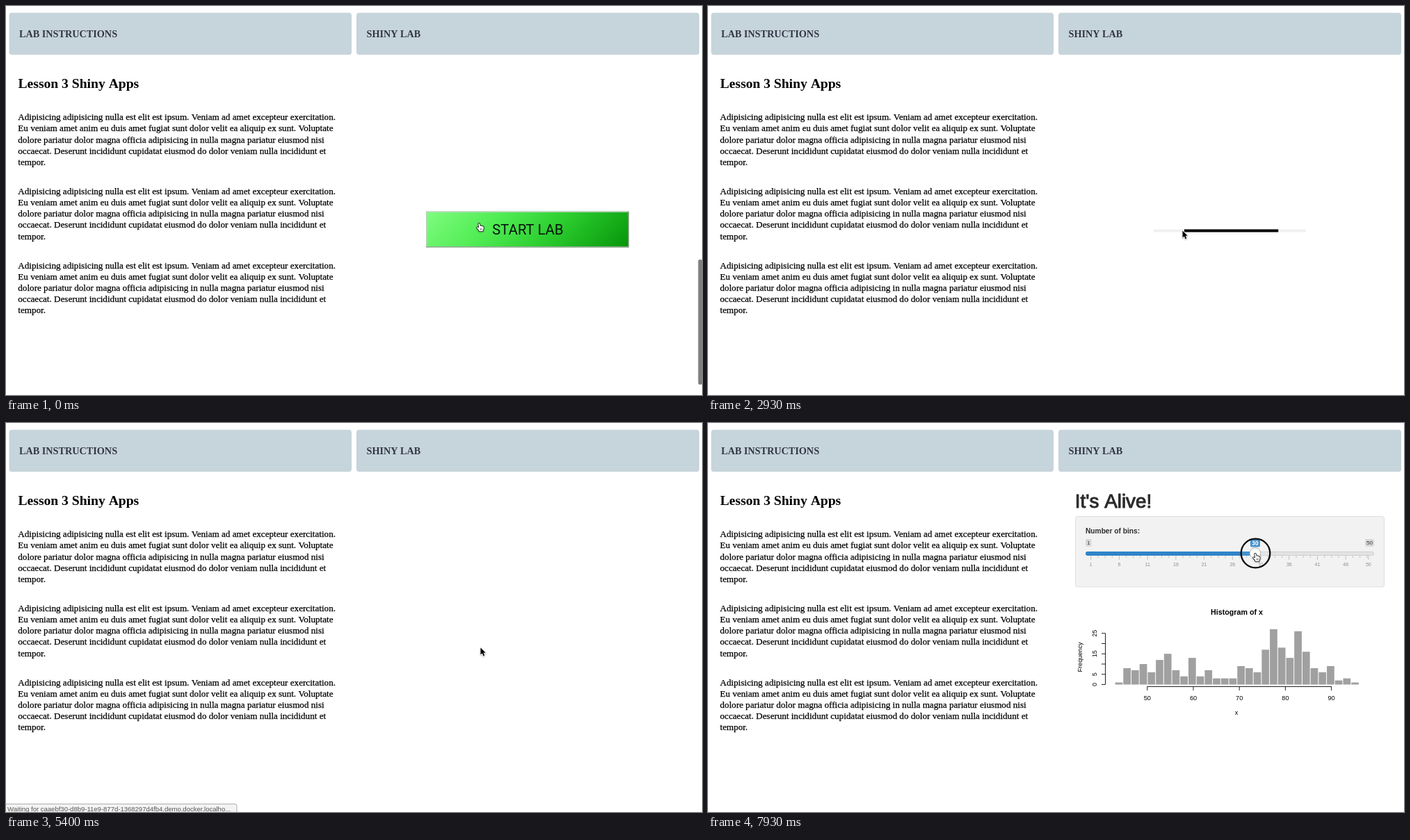
Write an HTML page with a canvas that moves like this. It is 1001 by 560 pixels and loops after 8 s.

```html
<!DOCTYPE html>
<html lang="en">
<head>
<meta charset="utf-8">
<title>Shiny lab</title>
<style>
  html, body { margin: 0; width: 100%; height: 100%; overflow: hidden; background: #fff; }
  canvas { display: block; width: 1001px; height: 560px; }
</style>
</head>
<body>
<canvas id="stage" width="1001" height="560"></canvas>
<script>
const ctx = document.getElementById('stage').getContext('2d');
const LOOP = 8000;
const SERIF = '"Liberation Serif", serif';
const SANS = '"Liberation Sans", sans-serif';

const PARAGRAPH = [
  'Adipisicing adipisicing nulla est elit est ipsum. Veniam ad amet excepteur exercitation.',
  'Eu veniam amet anim eu duis amet fugiat sunt dolor velit ea aliquip ex sunt. Voluptate',
  'dolore pariatur dolor magna officia adipisicing in nulla magna pariatur eiusmod nisi',
  'occaecat. Deserunt incididunt cupidatat eiusmod do dolor veniam nulla incididunt et',
  'tempor.'
];
const COUNTS = [1, 8, 7, 10, 6, 12, 15, 7, 4, 13, 4, 7, 3, 3, 3,
                9, 8, 6, 17, 27, 18, 13, 26, 16, 8, 6, 9, 2, 3, 1];

const clamp = v => Math.min(1, Math.max(0, v));
const ramp = (t, from, to) => clamp((t - from) / (to - from));
const smooth = p => p * p * (3 - 2 * p);
const mix = (a, b, p) => a + (b - a) * p;

function text(str, x, y, font, color = '#000', align = 'left', weight = 0) {
  ctx.font = font;
  ctx.fillStyle = ctx.strokeStyle = color;
  ctx.textAlign = align;
  ctx.fillText(str, x, y);
  if (weight) {
    ctx.lineWidth = weight;
    ctx.lineJoin = 'round';
    ctx.strokeText(str, x, y);
  }
}

function verticalText(str, x, y, font) {
  ctx.save();
  ctx.translate(x, y);
  ctx.rotate(-Math.PI / 2);
  text(str, 0, 0, font, '#000', 'center');
  ctx.restore();
}

function box(x, y, w, h, radius, fill, stroke) {
  ctx.beginPath();
  ctx.roundRect(x, y, w, h, radius);
  ctx.fillStyle = fill;
  ctx.fill();
  if (stroke) {
    ctx.strokeStyle = stroke;
    ctx.lineWidth = 1;
    ctx.stroke();
  }
}

function line(x1, y1, x2, y2, color, width = 1) {
  ctx.beginPath();
  ctx.moveTo(x1, y1);
  ctx.lineTo(x2, y2);
  ctx.strokeStyle = color;
  ctx.lineWidth = width;
  ctx.stroke();
}

function faded(alpha, draw) {
  if (alpha <= 0) return;
  ctx.save();
  ctx.globalAlpha = alpha;
  draw();
  ctx.restore();
}

function drawPage() {
  ctx.fillStyle = '#fff';
  ctx.fillRect(0, 0, 1001, 560);
  box(4.5, 9.7, 492.5, 60.5, 4, '#c6d4db');
  box(504, 9.7, 493, 60.5, 4, '#c6d4db');
  text('LAB INSTRUCTIONS', 19, 44.7, `bold 14.22px ${SERIF}`, '#333645');
  text('SHINY LAB', 518.5, 44.7, `bold 14.22px ${SERIF}`, '#333645');
  text('Lesson 3 Shiny Apps', 17.5, 117.6, `bold 19.6px ${SERIF}`);
  for (let p = 0; p < 3; p++) {
    PARAGRAPH.forEach((row, i) =>
      text(row, 17.3, 164.3 + p * 106.8 + i * 16.1, `13.13px ${SERIF}`, '#000', 'left', 0.25));
  }
}

function drawButton() {
  const fill = ctx.createLinearGradient(664, 235.5, 836, 407.5);
  fill.addColorStop(0, '#80fc80');
  fill.addColorStop(0.33, '#50ec54');
  fill.addColorStop(0.6, '#2dcf31');
  fill.addColorStop(1, '#069408');
  ctx.fillStyle = fill;
  ctx.fillRect(604, 295.5, 292, 52);
  line(604, 296.2, 896, 296.2, '#c9d0c9', 1.6);
  line(604.7, 296, 604.7, 347, '#c0d2c0', 1.4);
  line(604, 346.8, 896, 346.8, '#9aa59a', 1.6);
  line(895.4, 296, 895.4, 347, '#8fa08f', 1.4);
  text('START LAB', 750.5, 329, '20.3px Roboto, sans-serif', '#04120a', 'center');
}

// The head of the bar runs ahead quickly, the tail follows at a steady pace.
function drawLoader(t) {
  const left = 641, width = 219;
  ctx.fillStyle = '#f1f1f1';
  ctx.fillRect(left, 321.5, width, 4);
  if (t < 1024) return;
  const s = ((t - 1024) % 1605) / 1000;
  const tail = clamp(s * 0.664), head = clamp(s * 2.71);
  ctx.fillStyle = '#000';
  ctx.fillRect(left + tail * width, 321.5, (head - tail) * width, 4);
}

function drawSlider(active) {
  box(528.5, 134.5, 444, 101.5, 3, '#f2f2f2', '#dedede');
  text('Number of bins:', 543, 159.3, `bold 10.2px ${SANS}`, '#2e2e2e');

  box(543, 167, 8.5, 11, 2, '#d9d9d9');
  text('1', 547.2, 175.4, `8px ${SANS}`, '#333', 'center');
  box(945, 167, 13, 11, 2, '#d9d9d9');
  text('50', 951.5, 175.4, `8px ${SANS}`, '#333', 'center');
  box(780, 166.5, 14, 12, 2, '#2f84c8');
  text('30', 787, 175.6, `bold 8.4px ${SANS}`, '#fff', 'center');

  const unit = 8.145;
  for (let k = 0; k <= 39; k++) {
    const x = 550.7 + k * unit * 1.25;
    if (x > 950) break;
    line(x, 191, x, k % 4 ? 194 : 197, '#b5b5b5', 0.8);
  }
  line(949.8, 191, 949.8, 197, '#b5b5b5', 0.8);
  for (let v = 1; v <= 51; v += 5) {
    const value = Math.min(v, 50);
    text(v > 50 ? 50 : v, 550.7 + (value - 1) * unit, 206.3, `7px ${SANS}`, '#8c8c8c', 'center');
  }

  box(543.5, 185.5, 414, 5, 2.5, '#e3e3e3', '#cfcfcf');
  box(543, 185, 244, 6, 3, '#2f84c8');
  ctx.beginPath();
  ctx.arc(787, 187.5, 7.8, 0, Math.PI * 2);
  ctx.fillStyle = active ? '#fff' : '#dadada';
  ctx.fill();
  ctx.strokeStyle = '#a9a9a9';
  ctx.lineWidth = 1;
  ctx.stroke();
}

function drawHistogram() {
  const base = 376.5, unit = 2.95, binWidth = 11.71;
  text('Histogram of x', 760.5, 276, `bold 10.7px ${SANS}`, '#000', 'center');
  COUNTS.forEach((n, i) => {
    ctx.fillStyle = '#a0a0a0';
    ctx.fillRect(585.6 + i * binWidth, base - n * unit, binWidth - 1, n * unit);
  });

  line(631.5, 379.5, 897, 379.5, '#222');
  for (let i = 0; i < 5; i++) {
    const x = 631.8 + i * 66.2;
    line(x, 379.5, x, 385, '#222');
    text(50 + i * 10, x, 398.6, `9.2px ${SANS}`, '#000', 'center');
  }
  line(571.5, base, 571.5, base - 25 * unit, '#222');
  for (let n = 0; n <= 25; n += 5) {
    const y = base - n * unit;
    line(566, y, 571.5, y, '#222');
    if (n % 10 || n === 0) verticalText(n, 559, y, `9px ${SANS}`);
  }
  verticalText('Frequency', 538, 337, `9.1px ${SANS}`);
  text('x', 760, 420, `9.2px ${SANS}`, '#000', 'center');
}

function drawApp(t) {
  text("It's Alive!", 527.8, 121.8, `27.8px ${SANS}`, '#2b2b2b', 'left', 1);
  drawSlider(t >= 7780);
  if (t >= 6530) drawHistogram();
}

function drawStatus() {
  box(-2, 548.5, 334, 14, [0, 3, 0, 0], '#f3f3f3', '#adadad');
  text('Waiting for caaebf30-d8b9-11e9-877d-1368297d4fb4.demo.docker.localho...',
    2, 558.6, `9.53px ${SANS}`, '#555');
}

function drawRing(x, y) {
  ctx.beginPath();
  ctx.arc(x, y, 20.8, 0, Math.PI * 2);
  ctx.fillStyle = 'rgba(255,255,255,.1)';
  ctx.fill();
  ctx.strokeStyle = '#0a0a0a';
  ctx.lineWidth = 2.3;
  ctx.stroke();
}

function shape(x, y, scale, path, fill, stroke, width) {
  const outline = new Path2D(path);
  ctx.save();
  ctx.translate(x, y);
  ctx.scale(scale, scale);
  ctx.lineJoin = 'round';
  ctx.shadowColor = 'rgba(0,0,0,.3)';
  ctx.shadowBlur = 2;
  ctx.shadowOffsetY = 1;
  ctx.strokeStyle = stroke;
  ctx.lineWidth = width;
  ctx.stroke(outline);
  ctx.shadowColor = 'transparent';
  ctx.fillStyle = fill;
  ctx.fill(outline);
  ctx.restore();
}

function drawArrow(x, y) {
  shape(x, y, 1, 'M.5 .5V10.6L2.9 8.4 4.6 12.4 6.4 11.6 4.7 7.7H7.8Z', '#000', '#fff', 1.4);
}

function drawHand(x, y) {
  shape(x, y, 0.92,
    'M-1.5 1Q-.5-.5.5 1L1.5 4.5Q2.5 3.6 3.4 4.7 4.4 4 5.2 5.2 6.5 4.8 6.8 6.4L6.5 9.5 5.6 11V12.7H-.2L-.6 11-3.8 7.4Q-3.8 5.8-2.2 6.4L-.5 7.5Z',
    '#fff', '#111', 1.7);
  line(x + 1.8, y + 7.4, x + 1.9, y + 10, '#333', 0.7);
  line(x + 3.5, y + 7.4, x + 3.5, y + 10, '#333', 0.7);
}

function drawCursor(t) {
  const settle = smooth(ramp(t, 100, 350));
  const travel = smooth(ramp(t, 7100, 7800));
  const x = mix(mix(680.7, 682, settle), 787.5, travel);
  const y = mix(mix(312.6, 323, settle), 187.5, travel);
  if ((t >= 430 && t < 700) || t >= 7900) drawRing(x, y);
  if (t < 870 || t >= 7780) drawHand(x, y);
  else drawArrow(x, y);
}

function render(t) {
  drawPage();
  if (t < 870) drawButton();
  else if (t < 4330) drawLoader(t);
  if (t >= 6270) drawApp(t);
  faded(1 - ramp(t, 300, 560), () => box(995.5, 365, 6, 180, 2.5, '#7f7f7f'));
  faded(Math.min(ramp(t, 4560, 4700), 1 - ramp(t, 6550, 6860)), drawStatus);
  drawCursor(t);
}

function tick() {
  render(performance.now() % LOOP);
  requestAnimationFrame(tick);
}
tick();
</script>
</body>
</html>
```
